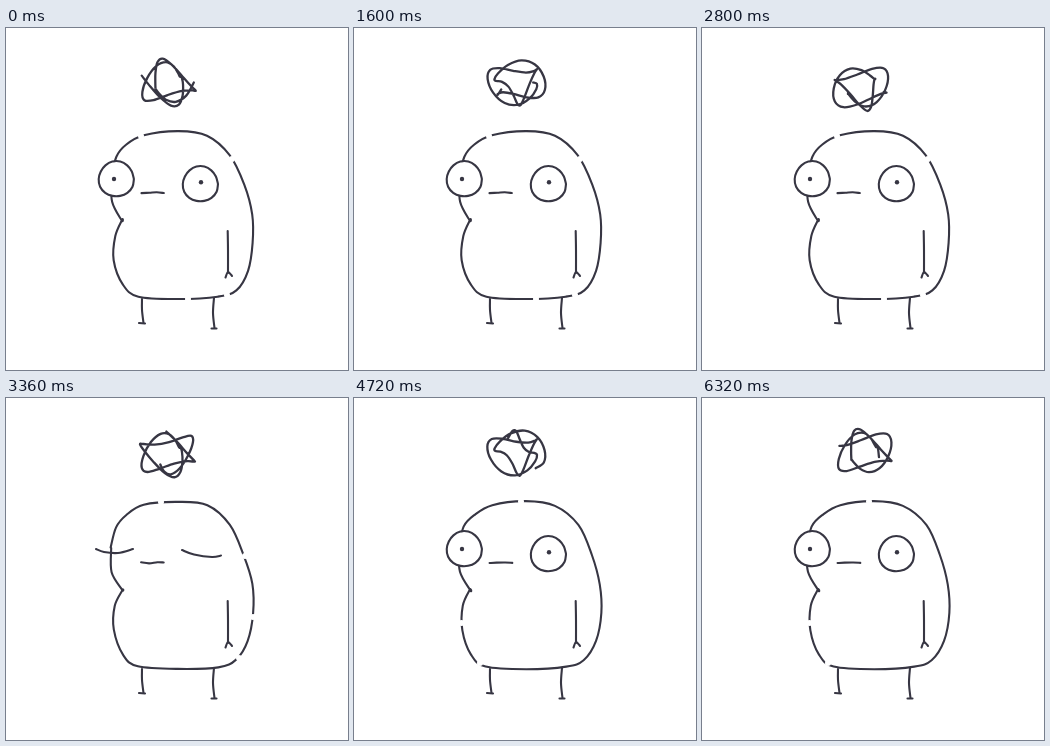
Animation, 342 px wide and 342 px high, one loop 6400 ms. Source, as an HTML page with a canvas:

```html
<!DOCTYPE html>
<html lang="en">
<head>
<meta charset="utf-8">
<title>Muddled thoughts</title>
<style>
html, body { margin: 0; width: 100%; height: 100%; overflow: hidden; background: #fff; }
canvas { display: block; width: 342px; height: 342px; }
</style>
</head>
<body>
<canvas id="stage"></canvas>
<script>
const STEP = 80, FRAMES = 80, SCRIBBLE_FRAMES = 40, SIZE = 342;
const INK = '#373643', PAPER = '#fff', TAU = Math.PI * 2;
const canvas = document.getElementById('stage');
const ctx = canvas.getContext('2d');
const ratio = window.devicePixelRatio || 1;
canvas.width = canvas.height = SIZE * ratio;

const points = text => text.split(' ').map(p => p.split(',').map(Number));
const sample = (count, at) => Array.from({ length: count + 1 }, (_, i) => at(i));

// Key points of the silhouette; the doubled one is the sharp chin
const outline = points('105,150 110,129 120,117 138,107 172,103.5 201,107.5 224,127 ' +
  '238,157 246,186 247,215 242,243 230,262 212,269 172,271 132,268.5 117,257 ' +
  '108,232 109,208 116,192 116,192 106,174 105,150');

// Where the pen lifts in each of the five redrawings
const penLifts = [
  '135,108 226,131 182,271 221,267',
  '205,109 245,183',
  '155,104 239,158 247,219 233,260',
  '109,131',
  '167,103.5 107.5,225 126,265'
].map(points);

// Smooth stroke through every point
function stroke(list, width = 2.1) {
  const last = list.length - 1;
  ctx.beginPath();
  ctx.moveTo(...list[0]);
  for (let i = 0; i < last; i++) {
    const a = list[Math.max(i - 1, 0)], b = list[i];
    const c = list[i + 1], d = list[Math.min(i + 2, last)];
    ctx.bezierCurveTo(
      b[0] + (c[0] - a[0]) / 6, b[1] + (c[1] - a[1]) / 6,
      c[0] - (d[0] - b[0]) / 6, c[1] - (d[1] - b[1]) / 6, c[0], c[1]);
  }
  ctx.lineWidth = width;
  ctx.stroke();
}

const line = text => stroke(points(text));

function disc(x, y, r, fill) {
  ctx.beginPath();
  ctx.arc(x, y, r, 0, TAU);
  ctx.fillStyle = fill;
  ctx.fill();
}

// Slight hand-drawn shift, different in each redrawing
const wobble = (list, pose) => list.map(([x, y], i) => [
  x + 0.4 * Math.sin(i * 1.9 + pose * 2.3),
  y + 0.4 * Math.cos(i * 2.3 + pose * 1.7)
]);

function drawEye(x, y, pose) {
  const rim = sample(14, i => {
    const angle = i / 14 * TAU;
    const r = 17.6 + 0.4 * Math.sin(angle * 3 + pose * 1.6);
    return [x + r * Math.cos(angle), y + r * Math.sin(angle)];
  });
  disc(x, y, 17, PAPER);
  stroke(rim);
}

function drawBody(pose, blinking) {
  stroke(wobble(outline, pose));
  penLifts[pose].forEach(([x, y]) => disc(x, y, 3, PAPER));
  if (blinking) {
    line('90,151 98,154 112,155 127,151');
    line('176,152 188,156.5 206,159 215,157.5');
  } else {
    drawEye(110.3, 151, pose);
    drawEye(194.4, 156, pose);
    disc(108, 151, 2.2, INK);
    disc(195, 154.3, 2.2, INK);
  }
  stroke(wobble(points('135.5,164.7 143,165 151,164.3 158,164.7'), pose));
  line('221.7,203 222,222 222,245');
  line('219.5,249.5 222,244 226,248');
  line('136,271 136,282 137.5,295');
  line('133,295 139,295.5');
  line('208,270 207,285 208.5,300');
  line('205.5,300.5 210.5,300.5');
}

// A moving stretch of one endless looping thread that bobs over the head
function drawScribble(frame) {
  const turnsPerLoop = 16, visibleTurns = 2.5, steps = 36;
  const bob = Math.cos(frame / 20 * TAU);
  const cx = 159 + 3.5 * bob, cy = 59 - 4.5 * bob;
  const start = frame / SCRIBBLE_FRAMES * turnsPerLoop;
  const thread = sample(steps, i => {
    const s = (start + i / steps * visibleTurns) * TAU;
    return [
      cx + 21 * Math.cos(s) + 8 * Math.cos(s * 27 / turnsPerLoop + 1),
      cy + 17 * Math.sin(s) + 7 * Math.sin(s * 37 / turnsPerLoop)
    ];
  });
  stroke(thread, 2.3);
}

function draw(now) {
  const frame = Math.floor(now / STEP) % FRAMES;
  ctx.setTransform(ratio, 0, 0, ratio, 0, 0);
  ctx.fillStyle = PAPER;
  ctx.fillRect(0, 0, SIZE, SIZE);
  ctx.strokeStyle = INK;
  ctx.lineCap = ctx.lineJoin = 'round';
  drawBody(frame % penLifts.length, frame >= 41 && frame <= 43);
  drawScribble(frame % SCRIBBLE_FRAMES);
}

let begin = null;
function tick(now) {
  if (begin === null) begin = now;
  draw(now - begin);
  requestAnimationFrame(tick);
}
draw(0);
requestAnimationFrame(tick);
</script>
</body>
</html>
```
